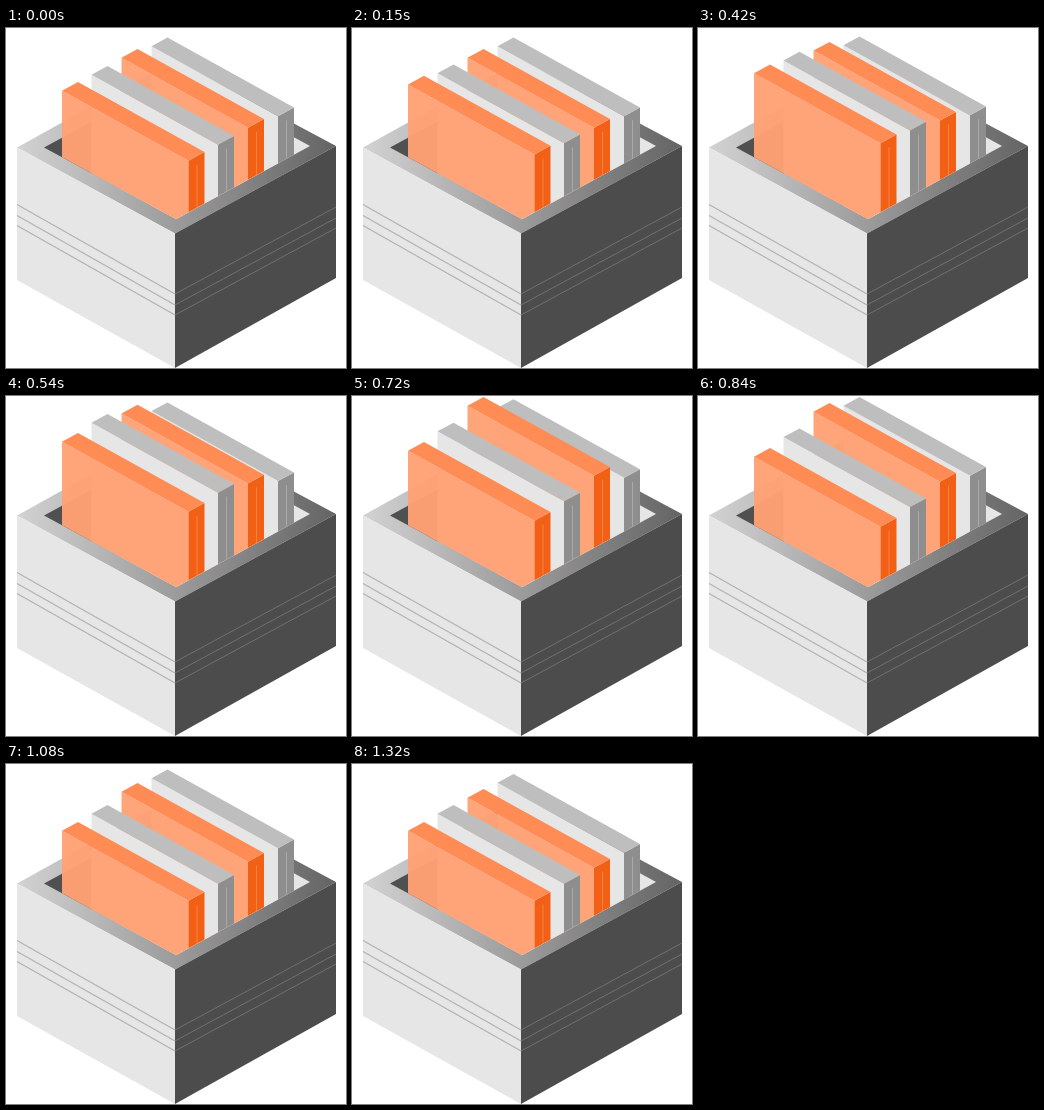
An HTML page for the animation above (1850 ms loop, 340 by 340 pixels).

```html
<!DOCTYPE html>
<html lang="en">
<head>
<meta charset="utf-8">
<title>File box</title>
<style>
  html, body { margin: 0; width: 100%; height: 100%; overflow: hidden; background: #fff; }
  svg { display: block; width: 100vw; height: 100vh; }
</style>
</head>
<body>
<svg id="stage" viewBox="0 0 340 340">
  <defs>
    <linearGradient id="rim" gradientUnits="userSpaceOnUse" x1="11" y1="0" x2="330" y2="0">
      <stop offset="0" stop-color="#d2d2d2"/>
      <stop offset="1" stop-color="#646464"/>
    </linearGradient>
    <clipPath id="opening"><path d="M38 -10V119.5L170 191L304 118V-10Z"/></clipPath>
  </defs>
  <path d="M11 119.5L169 32L330 118L169 205.5Z" fill="url(#rim)"/>
  <path d="M38 119.5L170 48V191Z" fill="#505050"/>
  <path d="M304 118L170 45V191Z" fill="#e6e6e6"/>
  <g id="files" clip-path="url(#opening)"></g>
  <path d="M11 119.5L169 205.5V340L11 252Z" fill="#e6e6e6"/>
  <path d="M330 118L169 205.5V340L330 250Z" fill="#4c4c4c"/>
  <g id="grooves" fill="none"></g>
</svg>
<script>
const NS = 'http://www.w3.org/2000/svg';
const LOOP = 1850, TICK = 30, LAST = 44;
const WIDTH = 126.5, DROP = 70, DEPTH = 16, RISE = 8.7, TALL = 180;

const orange = { front: '#ffa274', top: '#ff8c55', side: '#f16014', seam: '#ff8a50', alpha: 0.96 };
const grey = { front: '#e6e6e6', top: '#bebebe', side: '#8e8e8e', seam: '#b0b0b0', alpha: 1 };

// y: height of the top corner at the start, the peak and the end; at: ticks of those moments
const files = [
  { x: 145.5, skin: grey, y: [9.6, 1, 10], at: [12, 28, 44] },
  { x: 115.5, skin: orange, y: [21, 1, 25], at: [8.5, 24, 40] },
  { x: 85.5, skin: grey, y: [38, 18, 41], at: [4, 18, 34] },
  { x: 56, skin: orange, y: [54, 34, 58], at: [0, 16, 32] }
];

function add(parent, name, attrs) {
  const el = document.createElementNS(NS, name);
  for (const key in attrs) el.setAttribute(key, attrs[key]);
  return parent.appendChild(el);
}

function buildFile(file) {
  const { x, skin } = file;
  const right = x + WIDTH, far = right + DEPTH, low = RISE + DROP;
  const g = add(document.getElementById('files'), 'g', {});
  const face = (d, fill, alpha = 1) => add(g, 'path', { d, fill, 'fill-opacity': alpha });
  face(`M${x} ${RISE}L${right} ${low}V${low + TALL}L${x} ${TALL}Z`, skin.front, skin.alpha);
  face(`M${right} ${low}L${far} ${DROP}V${DROP + TALL}L${right} ${low + TALL}Z`, skin.side);
  face(`M${x} ${RISE}L${x + DEPTH} 0L${far} ${DROP}L${right} ${low}Z`, skin.top);
  add(g, 'path', {
    d: `M${right + 8.5} ${low + 4}V${low + TALL}`,
    stroke: skin.seam, 'stroke-width': 0.8
  });
  file.node = g;
}

function buildGrooves() {
  const g = document.getElementById('grooves');
  for (const y of [266, 277, 287]) {
    add(g, 'path', { d: `M11 ${y - 89.5}L169 ${y}`, stroke: '#b4b4b4', 'stroke-width': 1.4 });
    add(g, 'path', { d: `M169 ${y}L330 ${y - 87}`, stroke: '#707070', 'stroke-width': 1 });
  }
}

function ramp(t, a, b) {
  return Math.min(1, Math.max(0, (t - a) / (b - a)));
}

function height({ y: [start, peak, end], at: [go, turn, stop] }, t) {
  return start + (peak - start) * ramp(t, go, turn) + (end - peak) * ramp(t, turn, stop);
}

function draw(ms) {
  const tick = Math.min(LAST, Math.floor((ms % LOOP) / TICK));
  for (const file of files) {
    file.node.setAttribute('transform', `translate(0 ${height(file, tick).toFixed(2)})`);
  }
}

files.forEach(buildFile);
buildGrooves();
const begin = performance.now();
function frame() {
  draw(performance.now() - begin);
  requestAnimationFrame(frame);
}
frame();
</script>
</body>
</html>
```
